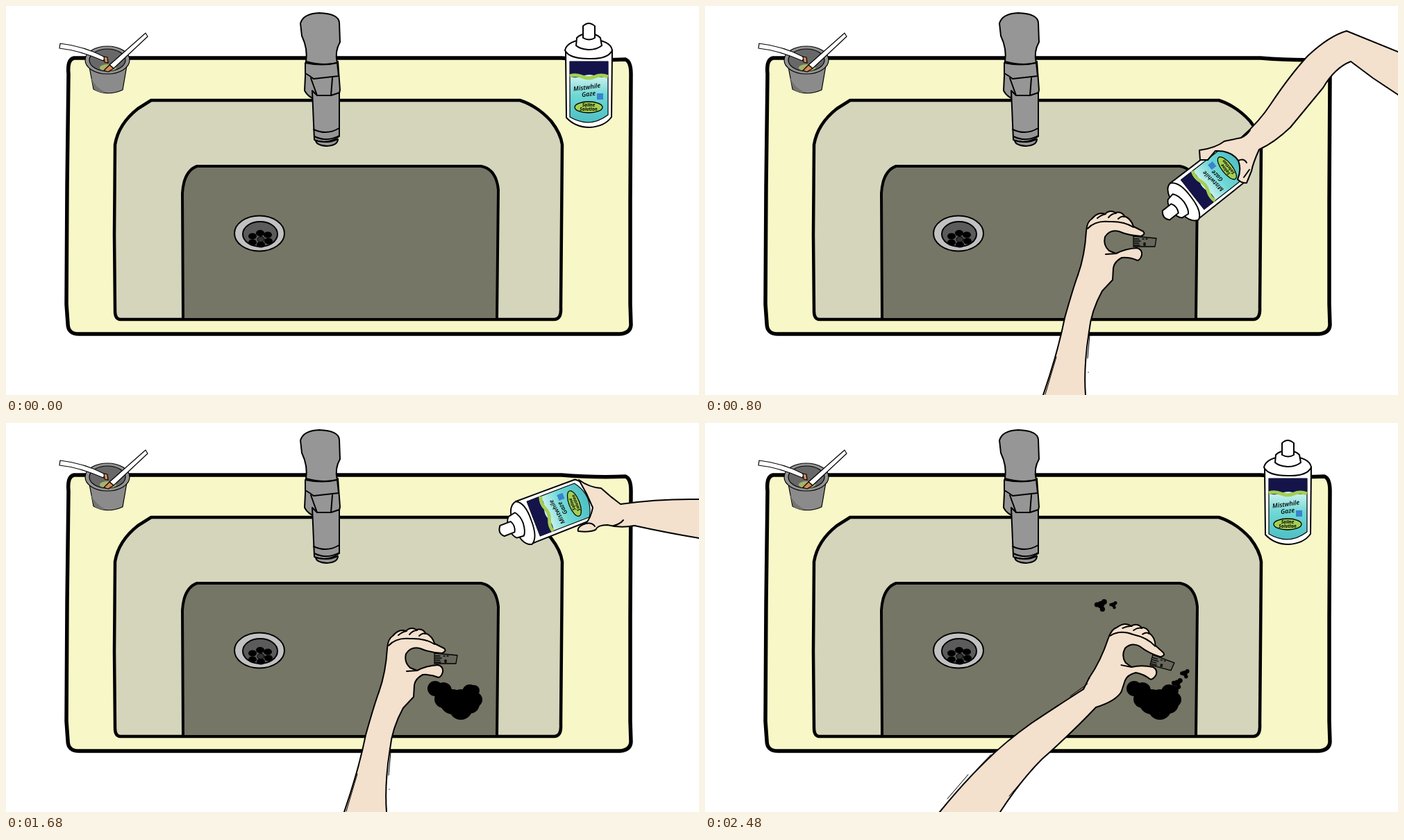
An HTML page for the animation above (2.65 s loop, 998x561 px).

```html
<!DOCTYPE html>
<html lang="en">
<head>
<meta charset="utf-8">
<title>Rinsing at the sink</title>
<style>
  html, body { margin: 0; width: 100%; height: 100%; overflow: hidden; background: #fff; }
  svg { display: block; width: 100%; height: 100%; stroke: #000; stroke-width: 2; stroke-linejoin: round; stroke-linecap: round; }
  text { fill: #000; stroke: none; font-family: "Open Sans", sans-serif; font-style: italic; text-anchor: middle; }
  .skin { fill: #f3e0cd; }
  .line { fill: none; }
  .metal { fill: #969696; }
  .ink { fill: #000; stroke: none; }
</style>
</head>
<body>
<svg viewBox="0 0 998 561">
  <defs>
    <linearGradient id="aqua" x2="0" y2="1">
      <stop offset=".25" stop-color="#c9f1ee"/><stop offset=".55" stop-color="#6fd8d5"/><stop offset="1" stop-color="#4dbfc4"/>
    </linearGradient>
  </defs>

  <g id="sink">
    <path fill="#f8f7c8" stroke-width="5.5" d="M98 75L300 75 520 75 800 75Q850 79 892 77Q900 80 900 98L899 280 899 430 900 460Q899 472 884 473L500 473 107 473Q89 474 89 458L87 430 88 260 90 98Q88 77 98 75Z"/>
    <path fill="#d5d5bc" stroke-width="4.5" d="M157 200Q162 170 190 148L209 136 740 136Q765 144 785 166Q799 184 801 200L799 435Q800 452 789 452L164 452Q157 451 157 440L156 330Z"/>
    <path fill="#767666" stroke-width="4" d="M255 452L254 270Q256 238 275 231L684 231Q706 235 709 265L707 452Z"/>
    <ellipse fill="#c1c1c1" cx="365" cy="328" rx="36" ry="25.5"/>
    <ellipse fill="#5b5b5b" cx="366" cy="329" rx="25" ry="18"/>
    <g id="holes" class="ink"></g>
    <ellipse fill="#333" cx="367" cy="336.500" rx="5" ry="4" stroke-width="1"/>
  </g>

  <g class="metal">
    <path d="M432 80L430 122Q435 132 447 135L478 135 481 121 478 80Z"/>
    <path d="M424 25Q428 11 451 10Q479 11 480 24L481 52Q473 66 477 82Q456 87 432 80Q435 62 426 43Z"/>
    <path d="M431 82L431 97Q438 101 443 105L479 101 477 82Q456 87 431 82Z"/>
    <path d="M441 122L444 193Q462 201 480 188L480 125 468 129 448 129Z"/>
    <path d="M439 104L448 129 468 129 470 104M443 178Q462 187 480 176M444 188Q462 197 480 187" class="line"/>
    <path d="M446 194Q447 201 462 202Q478 201 478 192Q462 199 446 194Z"/>
  </g>

  <g stroke-width="1.200">
    <path fill="#8b8b8b" d="M120 88L126 120Q146 131 168 121L174 86Z"/>
    <path fill="#737373" stroke="none" d="M122 102Q128 118 145 125Q133 126 127 120Z"/>
    <ellipse fill="#929292" cx="146" cy="78" rx="32" ry="20"/>
    <ellipse fill="#686868" cx="146" cy="78" rx="26" ry="16"/>
    <ellipse fill="#a6b46a" cx="147" cy="89" rx="12" ry="5" stroke="none"/>
    <path fill="#fff" d="M78 54Q113 58 143 74L140 79Q106 64 77 61Z"/>
    <path fill="#d98a55" d="M141 73L146 74 147 82 142 81Z"/>
    <path fill="#fff" d="M201 39L204 44 155 90 149 85Z"/>
    <path fill="#d98a55" d="M149 85L155 90 147 95 141 93Z"/>
  </g>

  <g id="pool" class="ink"></g>

  <g id="left">
    <g id="armLow" class="skin">
      <path d="M470 615L487 561Q508 500 518 450Q530 407 537 388L556 370 575 370 587 395 572 411Q556 440 553 470Q545 520 548 561L549 620"/>
      <path class="line" stroke-width="1" d="M490 560L506 506M554 475L551 508M552 528v.5"/>
    </g>
    <g id="armBent" class="skin">
      <path d="M238 670L338 561Q372 519 405 487Q432 460 470 433Q515 403 545 384L553 368 570 360 600 387Q592 401 563 410Q530 445 485 485Q455 515 425 561L350 680"/>
      <path class="line" stroke-width="1" d="M349 542L379 507M391 500L412 478M526 394L551 376M438 538L464 508"/>
    </g>
    <g id="hand">
      <path fill="#66665b" stroke-width="1.300" d="M617 332L650 335 648 347 617 347Z"/>
      <path class="line" stroke-width="1.300" d="M618 336h7M618 339h9M618 342h7M618 345h8M630 336h2M635 336h2M632 342h2v3h-2z"/>
      <path class="skin" d="M537 388Q547 360 549 325Q550 311 557 307Q566 296 576 300Q583 293 591 298Q600 296 604 303Q614 307 617 318L631 325Q635 329 628 332Q610 331 596 325Q583 322 576 333Q573 345 582 353L592 357Q605 350 622 349Q630 351 629 359Q627 366 623 367Q612 362 600 363Q589 369 588 378L587 395"/>
      <path class="line" d="M551 321Q562 309 582 311Q603 310 617 319M565 306Q571 301 577 300M581 305Q586 299 592 299M595 307Q600 302 604 304M577 358L592 357"/>
    </g>
  </g>

  <g id="right">
    <g id="bottle" fill="#fff">
      <path d="M806 66L807 161Q820 175 840 175Q862 174 872 160L873 64Z"/>
      <path fill="url(#aqua)" stroke-width="1.200" d="M812 80L867 80 867 157Q841 177 812 160Z"/>
      <path fill="#14144a" stroke="none" d="M812 80h55v21q-9 4-18 0t-18 0t-19 1z"/>
      <path fill="none" stroke="#a4cf52" stroke-width="5" stroke-linecap="butt" d="M812 101q9-3 18 1t18 0t19 0"/>
      <g transform="rotate(-8 838 120)" font-size="9" font-weight="600">
        <text x="837" y="120">Mistwhile</text>
        <text x="838" y="130">Gaze</text>
      </g>
      <rect x="851" y="126" width="9" height="9" fill="#3b83cf" stroke="none"/>
      <ellipse fill="#a4cf52" cx="839" cy="146" rx="20" ry="8" stroke-width="1.300"/>
      <text x="839" y="145" font-size="6.500" font-weight="bold">Saline</text>
      <text x="839" y="151" font-size="6.500" font-weight="bold">Solution</text>
      <path d="M805 64Q808 49 839 48Q871 49 873 64Q867 77 839 76Q811 76 805 64Z"/>
      <path d="M822 46Q827 40 839 40Q851 40 856 46L858 57Q851 63 839 63Q826 62 821 57Z"/>
      <path d="M831 29Q839 21 848 29L848 46Q840 51 831 46Z"/>
    </g>
    <g class="skin">
      <g id="armA">
        <path d="M1250 235L998 167Q950 157 910 138Q901 118 893 104Q885 91 873 84Q876 95 875 112Q873 132 870 147Q854 146 845 152Q848 158 864 156L884 170Q901 164 913 170Q937 193 965 203L998 212 1250 285"/>
        <path class="line" d="M870 147Q877 149 880 154M873 113Q877 108 876 101"/>
      </g>
      <g id="armB">
        <path d="M1250 112L998 110Q940 109 885 117Q870 106 857 94Q840 93 825 82L836 102 845 122Q842 137 835 145Q822 149 824 156Q840 158 849 154Q852 147 866 147Q885 152 905 148Q950 158 998 166L1250 195"/>
        <path class="line" d="M835 145Q844 143 848 149M875 148Q884 146 889 140"/>
      </g>
      <g id="armC">
        <path d="M1040 82L998 66 924 36Q899 43 868 72Q843 99 815 141Q799 166 772 190L748 195Q735 205 712 208L713 222 724 222 735 209Q758 208 768 223Q773 236 767 250Q773 256 780 255L787 238Q789 227 798 207Q820 197 843 175Q866 147 890 118Q907 89 930 80L962 104 998 128 1040 155"/>
        <path class="line" d="M772 190Q780 187 785 179M768 223Q776 219 780 226M784 236L776 247"/>
      </g>
    </g>
  </g>
  <g id="flow" class="ink"></g>
</svg>
<script>
const $ = id => document.getElementById(id);
const show = (id, on) => $(id).style.display = on ? '' : 'none';
const move = (id, transform) => $(id).setAttribute('transform', transform);
const dot = (x, y, r) => `<circle cx="${x}" cy="${y}" r="${r}"/>`;
const dots = list => list.map(d => dot(...d)).join('');
const splat = (x, y, r) => dots([[x, y, r * .65], [x - r * .7, y, r * .45], [x + r * .6, y - r * .5, r * .5], [x + r * .3, y + r * .8, r * .45]]);
const stroke = (d, w) => `<path d="${d}" fill="none" stroke="#000" stroke-width="${w}"/>`;

const STEP = 80, LOOP = 2650, LAST = 31;
const tilted = {
  A: '',
  B: 'translate(712 157) rotate(-111) scale(.97 .95) translate(-839 -26)',
  C: 'translate(662 304) rotate(-128) scale(.98 .95) translate(-839 -26)'
};
const puddle = dots([[618, 383, 11], [630, 386, 12], [630, 398, 13], [643, 402, 18], [655, 411, 17], [668, 405, 14], [675, 399, 11], [668, 388, 11], [674, 386, 8], [655, 398, 14]]);
// Each strand: its top x, then the centre and radius of the blob it ends in.
const strands = [[635, 626, 391, 8], [641, 640, 405, 8], [647, 656, 402, 10], [652, 668, 395, 9]];

$('holes').innerHTML = [[355, 332], [366, 327.5], [377, 330], [355, 341], [367, 344], [378, 339]]
  .map(([x, y]) => `<ellipse cx="${x}" cy="${y}" rx="6" ry="4.500"/>`).join('');

// The return trip mirrors the lift, then the hand withdraws.
function drawRight(s) {
  const upright = s < 7 || s > 22;
  const held = s > 0 && s < 28;
  const pose = !held ? '' : upright ? 'A' : s > 9 && s < 20 ? 'C' : 'B';
  const reach = s < 4 ? (4 - s) * 36 : s > 24 ? (s - 24) * 36 : 0;
  let shift = '';
  if (s === 6 || s === 23) shift = 'translate(-25 0) rotate(-25 905 150)';
  if (s === 7 || s === 22) shift = 'translate(25 -6)';
  if (s === 9 || s === 20) shift = 'translate(-60 60)';
  for (const a of 'ABC') show('arm' + a, a === pose);
  move('right', shift);
  move('bottle', tilted[pose] || '');
  move('armA', `translate(${reach} 0)`);
}

function drawLeft(s) {
  const bent = s > 28;
  show('left', s > 0);
  show('armLow', !bent);
  show('armBent', bent);
  move('hand', bent ? 'translate(581 310) rotate(15) translate(-549 -325)' : '');
  const x = s < 5 ? -14 : s === 5 ? -7 : s === 28 ? 14 : s === 29 ? 20 : s === 30 ? 30 : 0;
  const y = s < 4 ? (4 - s) * 68 : s === 29 ? -50 : s === 30 ? -25 : 0;
  move('left', `translate(${x} ${y})`);
}

function drawLiquid(s) {
  let flow = '', pool = '';
  if (s > 10 && s < 17) {
    const p = Math.min(1, (s - 10) / 4);
    flow += stroke(`M661 305Q650 310 ${661 - 17 * p} ${305 + 28 * p}`, 5);
  }
  if (s > 14 && s < 19) {
    const p = (s - 14) / 4;
    flow += dots([[643, 336, 7], [650, 342, 5], [637, 341, 5]]);
    for (const [top, x, y, r] of strands) {
      const ex = top + (x - top) * p, ey = 340 + (y - 340) * p;
      flow += stroke(`M${top} 340L${ex} ${ey}`, 5);
      if (p > .7) flow += dots([[ex, ey, r * p * .8], [ex - 5, ey + 2, 6 * p], [ex + 5, ey + 1, 6 * p]]);
    }
  }
  if (s === 19) pool = `<g transform="translate(647 400) scale(.88) translate(-647 -400)">${puddle}</g>`;
  if (s > 19) pool = puddle;
  if (s === 29) pool += splat(715, 270, 6) + splat(735, 245, 4);
  if (s === 30) pool += splat(600, 235, 6) + splat(790, 90, 5) + splat(710, 320, 5);
  if (s === LAST) pool += splat(570, 262, 8) + splat(588, 262, 5) + splat(691, 361, 6) + splat(680, 375, 7);
  $('flow').innerHTML = flow;
  $('pool').innerHTML = pool;
}

let shown = -1;
const start = performance.now();
function tick() {
  const s = Math.min(LAST, Math.floor((performance.now() - start) % LOOP / STEP));
  if (s !== shown) {
    shown = s;
    drawRight(s);
    drawLeft(s);
    drawLiquid(s);
  }
  requestAnimationFrame(tick);
}
tick();
</script>
</body>
</html>
```
